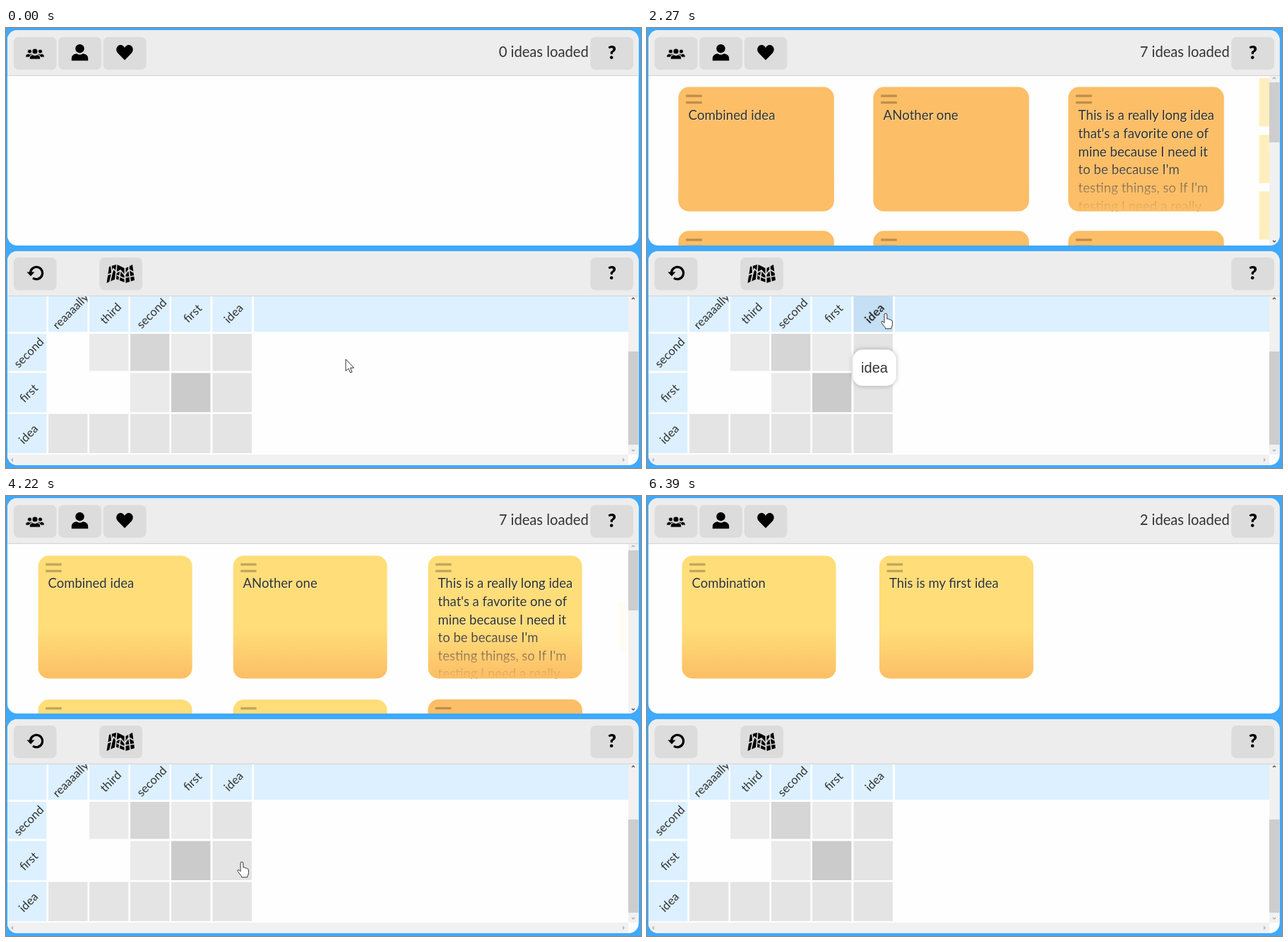
Write an HTML page that moves like this. It is 899 px wide and 623 px high and loops after 7.03 s.

```html
<!DOCTYPE html>
<html lang="en">
<head>
<meta charset="utf-8">
<title>Idea grid</title>
<style>
  html, body { margin: 0; width: 100%; height: 100%; overflow: hidden; background: #3fa9fc; }
  svg { display: block; width: 899px; height: 623px; }
  text { font-family: Lato, "Open Sans", sans-serif; fill: #333; }
  .count { font-size: 20.2px; text-anchor: end; }
  .help { font-size: 26px; font-weight: 900; text-anchor: middle; fill: #000; }
  .label { font-size: 16.6px; }
  .card text { font-size: 18.5px; text-shadow: 1px 1px 1px rgba(255,255,255,.45); }
  .tip { filter: drop-shadow(0 0 3px rgba(0,0,0,.28)); }
  .tip text { font: 20px "Liberation Sans", Arial, sans-serif; text-anchor: middle; }
</style>
</head>
<body>
<svg id="stage" viewBox="0 0 899 623" xmlns="http://www.w3.org/2000/svg"></svg>
<script>
const LOOP = 7030;
const YELLOW = '#ffdd78', ORANGE = '#fcbe66', PALE = '#dcf0ff', GREY = '#e4e4e4';
const COLS = [60, 118, 176, 234, 292.5];
const LONG_IDEA = ["This is a really long idea", "that's a favorite one of", "mine because I need it",
  "to be because I'm", "testing things, so If I'm", "testing I need a really"];

const rect = (x, y, w, h, fill, extra = '') =>
  `<rect x="${x}" y="${y}" width="${w}" height="${h}" fill="${fill}" ${extra}/>`;
const button = (x, y) => rect(x, y, 60.7, 46.3, '#dcdcdc', 'rx="7"');
const helpButton = y => button(827.3, y) + `<text class="help" x="858" y="${y + 31.3}">?</text>`;
const tilted = (word, x, y, id = '') =>
  `<text class="label" ${id} text-anchor="middle" transform="translate(${x} ${y}) rotate(-45)" y="6">${word}</text>`;
const chevron = (x, y, angle, color) =>
  `<path d="M-2 1L0 -1L2 1" transform="translate(${x} ${y}) rotate(${angle})" fill="none" stroke="${color}" stroke-width="1.2"/>`;

// Cards are drawn around their centre so that they can grow in place.
function card(x, y, lines = []) {
  const text = lines.map((line, i) => `<text x="14" y="${45.8 + i * 25.6}">${line}</text>`).join('');
  return `<g class="card" data-x="${x + 109}" data-y="${y + 87}">
    ${rect(0, 0, 218, 174, YELLOW, 'rx="15" class="base"')}
    <g clip-path="url(#cardClip)">
      ${rect(10.6, 10.8, 22.4, 3.3, '#000', 'opacity=".25"')}${rect(10.6, 20.1, 22.4, 3.3, '#000', 'opacity=".25"')}
      ${text}${rect(0, 104, 218, 70, 'url(#fade)')}
    </g></g>`;
}

const person = (x, y, s) => `<g transform="translate(${x} ${y}) scale(${s})">
  <circle cy="-6" r="6.2"/><path d="M-11.7 11V7.5Q-11.5 2-4.5 1Q0 4 4.5 1Q11.5 2 11.7 7.5V11Z"/></g>`;

const icons = `
  <g stroke="#dcdcdc" stroke-width="1.6">${person(33.5, 36, .48)}${person(48.5, 36, .48)}${person(41, 37, .66)}</g>
  ${person(104.5, 35.2, 1)}
  <path d="M168 45.5L158.2 35.5C153.5 30 158 23.5 162.5 24Q166 24.3 168 28Q170 24.3 173.500 24C178 23.500 182.500 30 177.800 35.500Z"/>
  <path d="M34.500 346A8.600 8.600 0 1 1 38 354" fill="none" stroke="#000" stroke-width="3.200"/>
  <path d="M29.500 345.500H40.500L35 351.500Z"/>
  <g><path d="M146 338L156 335L154 356L142.500 361ZM157.500 335L167.500 340V360L156 355.500ZM169.500 340L179 335L182 357L169.500 361Z"/>
    <path d="M143 350L150 347L152 341L157 346L162 343L168 350L174 342L181 346M149 337L150 347L147 360M162 343L160 358M174 336V342L176 359M169 353L182 351M157 350L168 355"
      fill="none" stroke="#dcdcdc" stroke-width="1.700"/></g>`;

const panel = (y, h, clip) => `<clipPath id="${clip}"><rect x="2" y="${y}" width="893.600" height="${h}" rx="14"/></clipPath>`;

const shade = (row, col, color) => rect(COLS[col], [433, 488.5, 546.5][row], 55.400, [52.5, 55.5, 55.5][row], color);
const cells = [
  [[1, '#eaeaea'], [2, '#d6d6d6'], [3, '#ebebeb'], [4, GREY]],
  [[2, '#eaeaea'], [3, '#cbcbcb'], [4, GREY]],
  [0, 1, 2, 3, 4].map(col => [col, GREY]),
].map((row, r) => row.map(([col, color]) => shade(r, col, color)).join('')).join('');

const gridHeader = rect(2, 380, 55.3, 50.3, PALE) + COLS.map(x => rect(x, 380, 55.4, 50.3, PALE)).join('')
  + rect(351, 380, 530, 50.3, PALE) + rect(2, 433, 55.3, 52.5, PALE)
  + rect(2, 488.5, 55.3, 55.5, PALE) + rect(2, 546.5, 55.3, 55.5, PALE);

const stage = document.getElementById('stage');
stage.innerHTML = `
<defs>
  ${panel(3, 305, 'topClip')}${panel(316, 303, 'bottomClip')}
  <clipPath id="cardClip"><rect width="218" height="174" rx="15"/></clipPath>
  <clipPath id="cornerClip"><rect x="60" y="380" width="55.400" height="50"/></clipPath>
  <clipPath id="bodyClip"><rect x="2" y="68" width="879" height="240"/></clipPath>
  <linearGradient id="fade" x1="0" y1="104" x2="0" y2="174" gradientUnits="userSpaceOnUse">
    <stop offset="0" stop-color="${ORANGE}" stop-opacity="0"/><stop offset="1" stop-color="${ORANGE}"/>
  </linearGradient>
</defs>
${rect(0, 0, 899, 623, '#3fa9fc')}
<g clip-path="url(#topClip)">
  ${rect(2, 3, 894, 305, '#fefefe')}${rect(2, 3, 894, 64, '#ededed')}${rect(2, 66.8, 894, 1.2, '#d6d6d6')}
  ${button(10.8, 12.7)}${button(74.2, 12.7)}${button(137.7, 12.7)}${helpButton(12.7)}
  <text class="count" id="count" x="824.800" y="41"></text>
  <g id="many">
    <g clip-path="url(#bodyClip)">
      <g id="strips">${[71, 151.3, 231.3].map(y => rect(866.7, y, 15, 68.3, '#ffdb75')).join('')}</g>
      ${card(45.6, 84.5, ['Combined idea'])}${card(321.6, 84.5, ['ANother one'])}${card(597.6, 84.5, LONG_IDEA)}
      ${[45.6, 321.6, 597.6].map(x => card(x, 288.3)).join('')}
    </g>
    ${rect(881, 68, 15, 240, '#f1f1f1')}${rect(881, 77, 15, 85, '#cdcdcd')}
    ${chevron(888, 71, 0, '#aaa')}${chevron(888, 302, 180, '#444')}
  </g>
  <g id="few">${card(49.5, 84.5, ['Combination'])}${card(329, 84.5, ['This is my first idea'])}</g>
  <g id="loader">
    <circle cx="431" cy="155.500" r="5" fill="#ffdb75"/><circle cx="447" cy="155.500" r="5.500" fill="#36a2f5"/>
    <circle cx="464.700" cy="155.500" r="5.500" fill="#e05c5c"/>
  </g>
</g>
<g clip-path="url(#bottomClip)">
  ${rect(2, 316, 894, 303, '#fefefe')}${rect(2, 316, 894, 63, '#ededed')}${rect(2, 378.8, 894, 1.2, '#d6d6d6')}
  ${button(10.8, 325)}${button(132.3, 325)}${helpButton(325)}
  ${gridHeader}${cells}
  <rect id="hover" x="292.500" y="380" width="55.400" height="50.300"/>
  <g clip-path="url(#cornerClip)"><text class="label" transform="translate(73 427.500) rotate(-45)">reaaaally long</text></g>
  ${tilted('third', 148, 404)}${tilted('second', 206, 404)}${tilted('first', 264, 404)}${tilted('idea', 322, 404, 'id="ideaLabel"')}
  ${tilted('second', 32, 459.5)}${tilted('first', 32, 517)}${tilted('idea', 31.5, 575)}
  ${rect(881, 380, 15, 224, '#f1f1f1')}${rect(881, 458, 15, 132, '#cdcdcd')}
  ${rect(2, 604, 879, 15, '#f1f1f1')}
  ${chevron(888, 383, 0, '#444')}${chevron(888, 598, 180, '#aaa')}
  ${chevron(9, 611.5, -90, '#aaa')}${chevron(874, 611.5, 90, '#aaa')}
  <g id="tip" class="tip">${rect(291.3, 455.3, 61.5, 51.5, '#fff', 'rx="14"')}<text x="322" y="488">idea</text></g>
</g>
<g>${icons}</g>
<g id="cursor" fill="#fff" stroke="#333" stroke-linejoin="round">
  <path id="arrow" d="M0 0V16.500L3.900 13L6.500 19L9 18L6.500 12.200H11.500Z"/>
  <path id="hand" d="M-2 2a1.900 1.900 0 0 1 3.800 0V8q2.500-1 3 .8 2.200-.6 2.600 1 2-.2 2 1.800v4q0 2.500-1.700 5v1.200H-.5v-1.200L-5.600 13.800q-1.200-2.200.6-2.600 1.200 0 3 2.400Z"/>
</g>`;

const el = id => document.getElementById(id);
const show = (id, on) => el(id).setAttribute('display', on ? 'inline' : 'none');
const within = (t, a, b) => t >= a && t < b;
const clamp = v => Math.max(0, Math.min(1, v));
const ease = v => v * v * (3 - 2 * v);
const ramp = (t, on, off, dur) => t < off ? clamp((t - on) / dur) : 1 - clamp((t - off) / dur);

const path = [
  [0, 481, 469], [80, 479, 468], [400, 410, 435], [640, 346, 407], [720, 333, 403], [1120, 333, 403],
  [1330, 346, 406], [1600, 346, 406], [1850, 374, 416], [2020, 374, 416], [2270, 338, 404],
  [2920, 338, 404], [3050, 397.5, 430], [3300, 410, 465], [3610, 402, 494], [3900, 385, 512],
  [4220, 334, 518], [4330, 335, 521], [4580, 335, 521], [4880, 427, 515], [5040, 432, 513],
  [5200, 434, 512], [6040, 434, 512], [6370, 872, 624], [LOOP, 872, 640],
];

function cursorAt(t) {
  const i = path.findIndex(p => p[0] > t);
  const [t0, x0, y0] = path[i - 1], [t1, x1, y1] = path[i];
  const k = (t - t0) / (t1 - t0);
  return [x0 + (x1 - x0) * k, y0 + (y1 - y0) * k];
}

function setCard(node, level, hot) {
  const { x, y } = node.dataset;
  node.setAttribute('transform', `translate(${x} ${y}) scale(${1 + .1 * level}) translate(-109 -87)`);
  const base = node.querySelector('.base');
  base.setAttribute('fill', hot ? ORANGE : YELLOW);
  base.style.filter = hot ? `drop-shadow(0 0 2px rgba(0,0,0,${.35 * level}))` : '';
}

const manyCards = [...el('many').querySelectorAll('.card')];
const strips = [...el('strips').children];
el('few').querySelectorAll('.card').forEach(node => setCard(node, 0, false));

function draw(t) {
  const loading = within(t, 1160, 1320) || within(t, 4570, 5300);
  show('loader', loading);
  show('many', within(t, 1500, 4570));
  show('few', t >= 5480);
  el('count').textContent = loading ? '' : `${t < 1160 ? 0 : t < 4570 ? 7 : 2} ideas loaded`;

  // Hovering the column header lifts every card; the lower cell lifts only the last one.
  const allHot = within(t, 2200, 3080), lastHot = within(t, 4180, 4600);
  manyCards.forEach((node, i) => {
    const last = i === 5 ? ramp(t, 4180, 4600, 400) : 0;
    setCard(node, ease(ramp(t, 2190, 3080, 400)) + ease(last), allHot || (i === 5 && lastHot));
  });
  strips.forEach((node, i) => {
    const own = i === 1 ? ramp(t, 4210, 4600, 150) : 0;
    node.setAttribute('opacity', ramp(t, 2200, 3080, 150) + own);
  });

  const light = within(t, 660, 790) || within(t, 2210, 2340);
  const dark = within(t, 790, 1690) || within(t, 2340, 3080);
  show('hover', light || dark);
  el('hover').setAttribute('fill', dark ? '#1467a8' : '#c5dff5');
  el('ideaLabel').style.fill = dark ? '#fff' : '#333';
  el('ideaLabel').style.fontWeight = light || dark ? 700 : 400;
  el('tip').setAttribute('opacity', Math.max(ramp(t, 640, 1690, 70), ramp(t, 2190, 3080, 70)));

  [...el('loader').children].forEach((dot, i) =>
    dot.setAttribute('r', 5.2 + .5 * Math.sin((t - 4880) / 110 + i * 1.3 - .5)));

  const [x, y] = cursorAt(t);
  el('cursor').setAttribute('transform', `translate(${x} ${y})`);
  show('hand', x < 349);
  show('arrow', x >= 349);
}

const start = performance.now();
function tick() {
  draw((performance.now() - start) % LOOP);
  requestAnimationFrame(tick);
}
tick();
</script>
</body>
</html>
```
